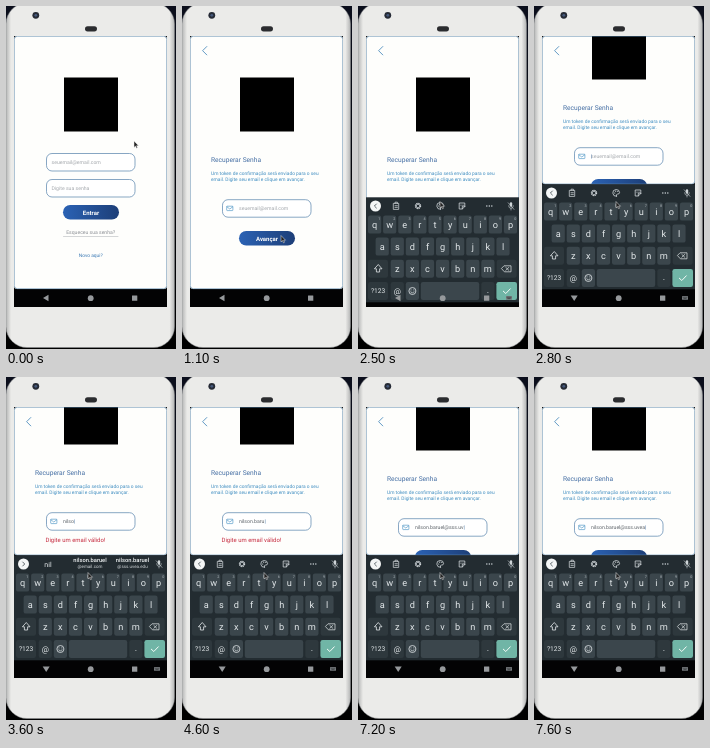
Recreate the animation shown at these times as an HTML page. Size 170x343 px, loop 8 s.

```html
<!DOCTYPE html>
<html lang="pt">
<head>
<meta charset="utf-8">
<style>
html, body { margin: 0; width: 100%; height: 100%; overflow: hidden; background: #000; }
svg { display: block; width: 100vw; height: 100vh; background: linear-gradient(#0b0e1c, #05060c 50%, #000); }
text { font-family: Roboto, Arial, sans-serif; text-rendering: geometricPrecision; white-space: pre; }
</style>
</head>
<body>
<svg id="stage" viewBox="0 0 170 343">
  <defs>
    <linearGradient id="blue"><stop stop-color="#2b62b4"/><stop offset="1" stop-color="#1d3f78"/></linearGradient>
    <linearGradient id="shell"><stop stop-color="#b4b5b5"/><stop offset=".03" stop-color="#ebebe9"/><stop offset=".97" stop-color="#ebebe9"/><stop offset="1" stop-color="#b4b5b5"/></linearGradient>
    <clipPath id="screen"><rect x="8" y="30" width="153" height="271"/></clipPath>
    <clipPath id="view"><rect id="viewBox" x="8" y="30" width="153" height="253"/></clipPath>
  </defs>
  <rect x="0" y="-3" width="168.5" height="344.5" rx="21" fill="url(#shell)" stroke="#8f9192" stroke-width=".5"/>
  <circle cx="29.8" cy="9.3" r="3.4" fill="#252a35"/>
  <circle cx="29.8" cy="9.3" r="1.4" fill="#46597c"/>
  <rect x="79" y="20.2" width="12" height="5.2" rx="2.6" fill="#2b2c2f"/>
  <rect x="8" y="30" width="153" height="271" fill="#030304"/>
  <g clip-path="url(#screen)">
    <g id="page"></g>
    <g id="keys"></g>
    <g id="nav"></g>
  </g>
  <path id="mouse" d="M0 0V6.4L1.5 5.1L2.5 7.3L3.5 6.8L2.6 4.7H4.5Z" fill="#222" stroke="#eee" stroke-width=".5"/>
</svg>
<script>
const LOOP = 8000, STEP = 100;
const $ = id => document.getElementById(id);
const EMAIL = 'nilson.baruel@sss.uvea';
const BLUE = '#3d8cc0';

// [time, value...] tracks: hold before and after, linear in between
const MOUSE = [[0, 128, 135], [400, 121, 217], [500, 121, 217], [700, 99, 229.5],
  [1300, 99, 229.5], [1500, 84, 196], [1600, 84, 196], [1800, 82, 195.5]];
const SLIDE = [[2300, 123], [2400, 62], [2500, 13], [2600, 3], [2700, 0]];
const SCROLL = [[2500, 0], [2800, 52], [3000, 52], [3200, 58], [7100, 58], [7200, 52]];
// [time, letters typed]
const TYPED = [[0, 0], [3000, 1], [3200, 2], [3400, 3], [3500, 4], [3600, 5], [3800, 6], [4200, 7],
  [4400, 8], [4500, 9], [4600, 11], [4800, 12], [5100, 13], [5400, 14], [5800, 15], [6000, 16],
  [6600, 17], [6700, 18], [7200, 20], [7500, 21], [7600, 22]];
const HINTS = [[0, 0], [3000, 1], [3400, 2], [3500, 3], [3800, 5], [4200, 6]];

function lerp(track, t) {
  let a = track[0];
  for (const b of track) {
    if (t < b[0]) {
      const k = Math.max(0, (t - a[0]) / (b[0] - a[0] || 1));
      return a.slice(1).map((v, i) => v + (b[i + 1] - v) * k);
    }
    a = b;
  }
  return a.slice(1);
}
const latest = (track, t) => track.filter(k => k[0] <= t).pop()[1];

const text = (x, y, s, size, fill, more = '') =>
  `<text x="${x}" y="${y}" font-size="${size}" fill="${fill}" ${more}>${s}</text>`;
const mid = (x, y, s, size, fill, more = '') => text(x, y, s, size, fill, 'text-anchor="middle" ' + more);
const rect = (x, y, w, h, r, fill, more = '') =>
  `<rect x="${x}" y="${y}" width="${w}" height="${h}" rx="${r}" fill="${fill}" ${more}/>`;
const line = (d, color, w = .8) =>
  `<path d="${d}" fill="none" stroke="${color}" stroke-width="${w}" stroke-linecap="round" stroke-linejoin="round"/>`;
const field = y => rect(40.5, y, 88.5, 17.5, 5.5, '#fff', 'stroke="#5582ab" stroke-width=".7"');
const button = (y, s) => rect(57, y, 56, 14.5, 7.2, 'url(#blue)') +
  mid(85, y + 9.5, s, 6, '#fff', 'font-weight="700"');
const logo = rect(58, 71.5, 54, 54, 0, '#000');

const login = t => logo + field(147.5) + field(173.5) +
  text(45.5, 158, 'seuemail@email.com', 5.15, '#a4a8ad') +
  text(45.5, 184, 'Digite sua senha', 5.15, '#a4a8ad') +
  button(199, 'Entrar') +
  `<g opacity="${t < 900 ? 1 : .35}">` + mid(84.7, 227.7, 'Esqueceu sua senha?', 5.1, '#8b8f94') +
  line('M57.5 230.5H112', '#a9adb1', .5) + '</g>' +
  mid(84.7, 251, 'Novo aqui?', 4.85, '#3a79b4');

function recover(t, typed) {
  const [up] = lerp(SCROLL, t), bad = typed && t < 7200;
  const caret = t >= 2100 ? '<tspan fill="#2d5f94">|</tspan>' : '';
  return `<g transform="translate(0 ${-up})">` + logo +
    text(29, 156.4, 'Recuperar Senha', 6.65, '#466fa4') +
    text(29, 169.2, 'Um token de confirmação será enviado para o seu', 4.85, BLUE) +
    text(29, 175.1, 'email. Digite seu email e clique em avançar.', 4.85, BLUE) +
    field(193.7) +
    rect(44.7, 200.2, 6.2, 4.4, .6, 'none', `stroke="${BLUE}" stroke-width=".6"`) +
    line('M44.9 200.8L47.8 203L50.7 200.8', BLUE, .6) +
    (typed ? '' : text(57, 204.2, 'seuemail@email.com', 5.15, '#a4a8ad')) +
    text(57, 204.2, EMAIL.slice(0, typed) + caret, 5.15, '#5c6268') +
    (bad ? text(39.5, 223.2, 'Digite um email válido!', 5.95, '#c5283d') : '') +
    button(bad ? 237 : 225, 'Avançar') + '</g>' +
    line('M24.8 40.5L20.6 44.7L24.8 48.9', '#3a80b6');
}

function toolbar(t, typed) {
  const hints = typed && t < 4400, ink = '#cfd5d8';
  let s = `<circle cx="17.5" cy="187" r="5.5" fill="#f4f6f6"/>` +
    line(hints ? 'M16.7 185L18.7 187L16.7 189' : 'M18.4 185L16.4 187L18.4 189', '#39444a');
  if (hints) {
    s += mid(42, 189.5, EMAIL.slice(0, latest(HINTS, t)), 7, '#e8ecee');
    [[84, '@email.com'], [126.5, '@sss.uvea.edu']].forEach(([x, host]) =>
      s += mid(x, 185, EMAIL.slice(0, 13), 5.75, '#f0f3f4', 'font-weight="500"') +
        mid(x, 191.4, host, 4.5, '#d5dadd'));
  } else {
    s += line('M35.7 184.4H40.7V190.4H35.7ZM37 184.4V183.2H39.4V184.4M37 186.7H39.4M37 188.4H39.4', ink, .75) +
      `<circle cx="60" cy="187" r="2.6" fill="none" stroke="${ink}" stroke-width="1.2" stroke-dasharray="1.36 .68"/>` +
      `<circle cx="60" cy="187" r="1.8" fill="none" stroke="${ink}" stroke-width=".8"/>` +
      line('M82.5 190.3A3.4 3.4 0 1 1 85.6 186.7Q85.4 188.3 83.3 188Q82 188.4 82.5 190.3', ink) +
      [[80.7, 187], [81.7, 185.2], [83.8, 185.5]].map(([x, y]) =>
        `<circle cx="${x}" cy="${y}" r=".6" fill="${ink}"/>`).join('') +
      line('M106.8 187.5V184H101.2V190H104.3M106.8 187.5L104.3 190V187.5ZM103 186V186.4M105 186V186.4', ink) +
      [128.8, 131.3, 133.8].map(x => `<circle cx="${x}" cy="187" r=".75" fill="${ink}"/>`).join('');
  }
  return s + rect(151.8, 183.2, 2.4, 4.6, 1.2, ink) +
    line('M150.6 186.8Q150.8 189.3 153 189.3Q155.2 189.3 155.4 186.8M153 189.3V191M150.2 183.8L156 190.4', ink, .6);
}

function keyboard() {
  const ink = '#e3e8ea', dark = '#2e383d';
  const key = (x, y, w, fill = '#3b464c') => rect(x - w / 2, y - 9, w, 18, 2.2, fill);
  let s = '';
  [['qwertyuiop', 16.6, 205.6], ['asdfghjkl', 24.2, 227.6], ['zxcvbnm', 39.3, 249.8]].forEach(([row, x0, y]) =>
    [...row].forEach((c, i) => {
      const x = x0 + i * 15.1;
      s += key(x, y, 13.2) + mid(x, y + 3.2, c, 9.2, ink);
      if (row.length > 9) s += mid(x + 4.7, y - 4.6, (i + 1) % 10, 3.7, '#b5bdc1');
    }));
  s += key(20, 249.8, 20, dark) + key(148.7, 249.8, 20, dark) +
    line('M20 245.8L16.4 249.8H18.4V253H21.6V249.8H23.6Z', ink) +
    line('M146.4 246.8H153V252.8H146.4L143.7 249.8ZM147.8 248.4L150.8 251.3M150.8 248.4L147.8 251.3', ink, .7) +
    key(20, 272, 20, dark) + mid(20, 274.4, '?123', 6.6, ink) +
    key(39.3, 272, 13.2, dark) + mid(39.3, 274.6, '@', 8, ink) +
    key(54.4, 272, 13.2) + key(92, 272, 58.4) +
    `<circle cx="54.4" cy="272" r="3.5" fill="none" stroke="${ink}" stroke-width=".8"/>` +
    line('M52.7 273Q54.4 275 56.1 273M53 270.8V271M55.8 270.8V271', ink, .7) +
    key(129.9, 272, 13.2, dark) + mid(129.9, 274, '.', 9, ink) +
    key(148.7, 272, 20.6, '#70b5a6') + line('M145.3 272.2L147.8 274.5L152.3 269.8', '#f4fbf9', 1);
  return s;
}
const KEYS = keyboard();

function nav(t) {
  const c = '#96999c';
  return `<path d="${t < 2600 ? 'M37 292L42.5 288.8V295.2Z' : 'M36.7 289.5H43.7L40.2 295Z'}" fill="${c}"/>` +
    `<circle cx="84.7" cy="292.2" r="2.9" fill="${c}"/>` + rect(126, 289.5, 5.3, 5.3, .3, c) +
    (t >= 2300 ? rect(148, 290, 6, 3.8, .5, '#777b7e') +
      line('M149 291.2H153M149.8 292.6H152.2', '#15181a', .5) : '');
}

function draw(t) {
  const typed = latest(TYPED, t), [drop] = lerp(SLIDE, t);
  const height = t < 2600 ? 253 : 148.3;
  $('viewBox').setAttribute('height', height);
  $('page').innerHTML = rect(8, 30, 153, height, 3, '#fefefc') +
    '<g clip-path="url(#view)">' + (t < 1100 ? login(t) : recover(t, typed)) + '</g>' +
    rect(8.3, 30.3, 152.4, height - .6, 3, 'none', 'stroke="#5683a8" stroke-width=".6"');
  $('keys').innerHTML = t < 2400 ? '' : `<g transform="translate(0 ${drop})">` +
    rect(8, 178.3, 153, 105, 0, '#232c31') + toolbar(t, typed) + KEYS + '</g>';
  $('nav').innerHTML = nav(t);
  $('mouse').setAttribute('transform', `translate(${lerp(MOUSE, t).join(' ')})`);
}

let shown = -1;
const start = performance.now();
function tick() {
  const t = Math.floor((performance.now() - start) % LOOP / STEP) * STEP;
  if (t !== shown) draw(shown = t);
  requestAnimationFrame(tick);
}
tick();
</script>
</body>
</html>
```
